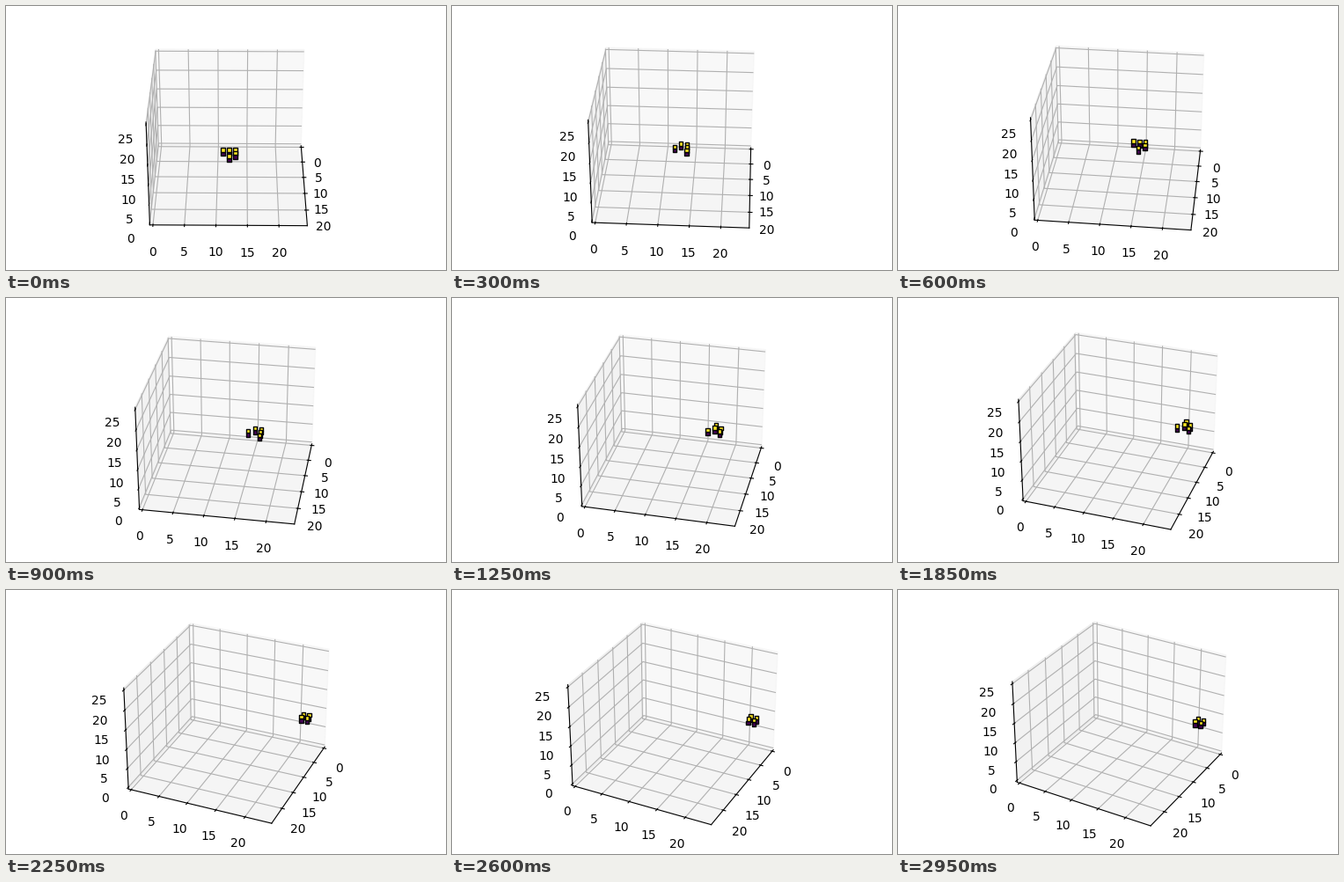
Animation, 500 px wide and 300 px high, one loop 3 s. Source, as a matplotlib script:

```python
import numpy as np
import matplotlib.pyplot as plt
from matplotlib.animation import FuncAnimation

SIZE, FRAMES = 24, 60
LAYERS = (10, 11)
GLIDER = [(15, 11), (15, 12), (15, 13), (16, 13), (17, 12)]


def step(grid):
    """One generation of Life with dead borders."""
    padded = np.pad(grid, 1)
    count = sum(padded[1 + r:1 + r + SIZE, 1 + c:1 + c + SIZE]
                for r in (-1, 0, 1) for c in (-1, 0, 1) if r or c)
    return ((count == 3) | ((grid == 1) & (count == 2))).astype(int)


def evolve():
    grid = np.zeros((SIZE, SIZE), int)
    for cell in GLIDER:
        grid[cell] = 1
    states = [grid]
    while len(states) < FRAMES:
        states.append(step(states[-1]))
    return states


def padded_range(top):
    margin = top / 48
    return -margin, top + margin


states = evolve()

fig = plt.figure(figsize=(5, 3), dpi=100)
ax = fig.add_axes([0.05, 0.05, 0.9, 0.9], projection="3d")
ax.set_xlim(*padded_range(24))
ax.set_ylim(*padded_range(24))
ax.set_zlim(*padded_range(25))


def update(k):
    for artist in list(ax.collections):
        artist.remove()
    rows, cols = np.nonzero(states[k])
    x, y = np.tile(rows, 2), np.tile(cols, 2)
    z = np.repeat(LAYERS, len(rows))
    ax.scatter(x, y, z, c=z, cmap="viridis", vmin=LAYERS[0], vmax=LAYERS[1],
               marker="s", s=10, edgecolors="black", linewidths=1,
               depthshade=False)
    ax.view_init(elev=30, azim=0.5 * (k + 1))
    return []


anim = FuncAnimation(fig, update, frames=FRAMES, interval=50,
                     repeat=True, repeat_delay=0, blit=False)
plt.show()
```
